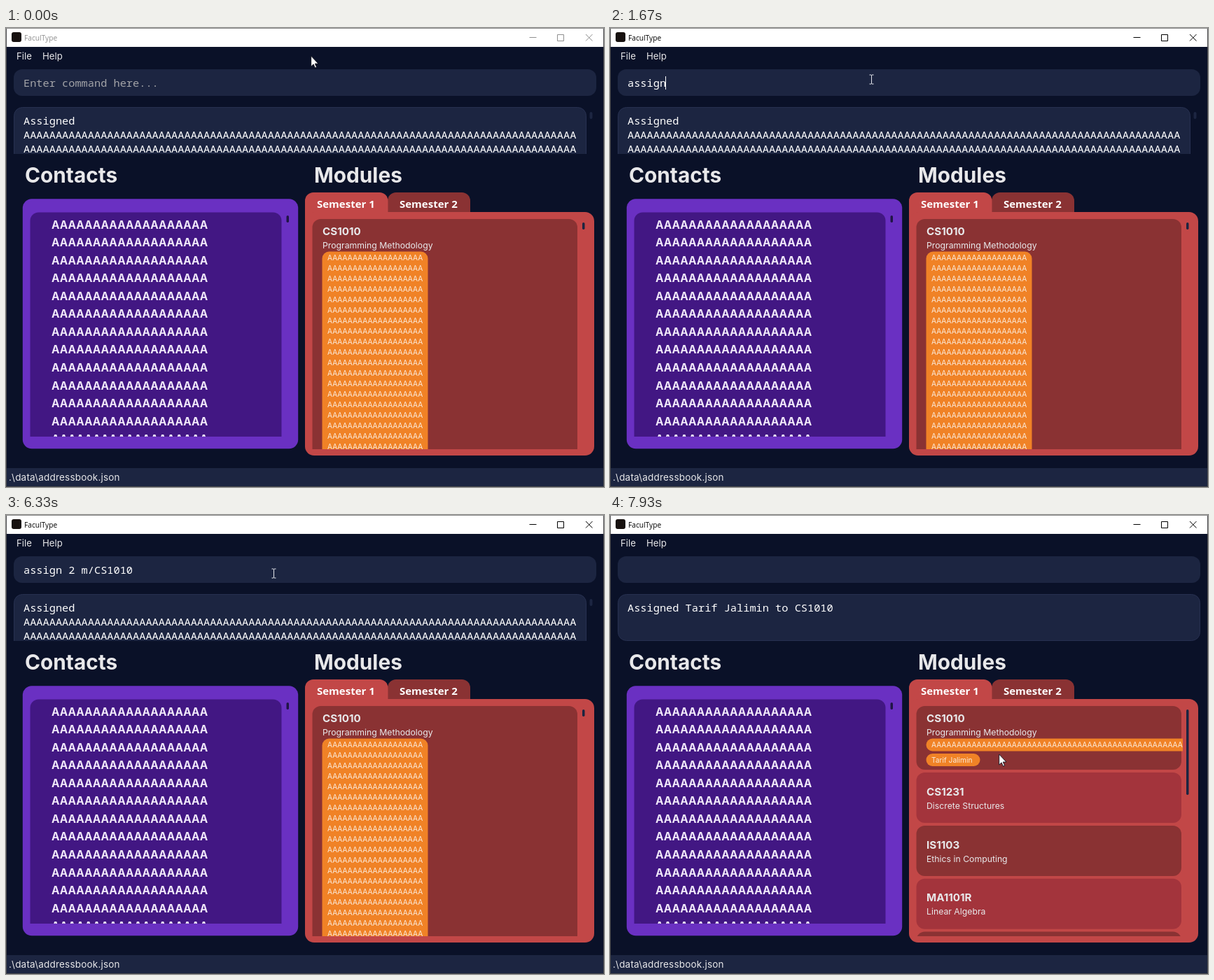
These frames come from a looping animation (854 by 656 pixels, 8 s). An HTML page:

```html
<!DOCTYPE html>
<html lang="en">
<head>
<meta charset="utf-8">
<title>FaculType</title>
<style>
  html, body { margin: 0; width: 100%; height: 100%; overflow: hidden; background: #0a1128; }
  svg { display: block; }
  text { font-family: Inter, sans-serif; fill: #e8e8ea; white-space: pre; }
  .mono { font: 15.3px "Noto Sans Mono", monospace; fill: #fff; }
  .hint { fill: #a3a4a8; }
  .head { font-size: 29.8px; font-weight: 700; }
  .menu { font-size: 13.2px; }
  .path { font-size: 13.5px; letter-spacing: .2px; }
  .contact { font-size: 15.4px; font-weight: 700; letter-spacing: .05px; fill: #f0e8fa; }
  .code { font-size: 15.2px; font-weight: 700; }
  .name { font-size: 12.25px; }
  .tag { font-size: 10.2px; fill: #fbebdc; }
  .tab { font: 700 15px "Open Sans", sans-serif; fill: #fff; }
  .caption { font: 10.2px "Open Sans", sans-serif; fill: currentColor; }
  #bar { color: #000; }
  #bar.idle { color: #8f8f8f; }
</style>
</head>
<body>
<svg id="stage" width="854" height="656" viewBox="0 0 854 656"></svg>
<script>
const LOOP = 8000, TICK = 1000 / 15;
const NAVY = '#1c2541', RED = '#c24747', MAROON = '#8a3233', CRIMSON = '#a3343c', ORANGE = '#f08226';

const box = (x, y, w, h, r, fill, extra = '') =>
  `<rect x="${x}" y="${y}" width="${w}" height="${h}" rx="${r}" fill="${fill}" ${extra}/>`;
// Rectangle rounded only at its top corners
const topBox = (x, y, w, h, r, fill) =>
  `<path d="M${x} ${y + h}V${y + r}a${r} ${r} 0 0 1 ${r} ${-r}h${w - 2 * r}a${r} ${r} 0 0 1 ${r} ${r}V${y + h}z" fill="${fill}"/>`;
const label = (cls, x, y, s) => `<text class="${cls}" x="${x}" y="${y}">${s}</text>`;
const rows = (n, cls, x, y, pitch, s) =>
  Array.from({ length: n }, (_, i) => label(cls, x, y + i * pitch, s)).join('');
const clip = (id, x, y, w, h) => `<clipPath id="${id}">${box(x, y, w, h, 0, '#000')}</clipPath>`;
const course = (y, h, fill, code, name, dy = 32.5) =>
  box(437.5, y, 378.5, h, 12, fill) + label('code', 452, y + dy, code) + label('name', 452, y + dy + 19.2, name);
const resultBox = (w, h) => box(11.5, 113.5, w - 1, h - 1, 12, NAVY, 'stroke="#273050"');

const A = n => 'A'.repeat(n);
const person = 'Tarif Jalimin';

const frame = `
  <defs>
    ${clip('resultClip', 11, 113, 832, 67)}
    ${clip('contactClip', 34, 263, 360, 321)}
    ${clip('moduleClip', 437, 273, 381, 329)}
  </defs>
  ${box(0, 0, 854, 656, 0, '#0a1128')}
  <g id="bar">
    ${box(0, 0, 854, 27, 0, '#fff')}
    ${box(8, 6, 14, 14, 3, '#17110f')}
    ${label('caption', 26, 18, 'FaculType')}
    <path d="M747.5 13.5h10M787.5 9.5h9v9h-9zM828 9l9.5 9.5M837.5 9l-9.5 9.5" fill="none" stroke="currentColor"/>
  </g>
  ${label('menu', 15, 45, 'File')}${label('menu', 52, 45, 'Help')}
  ${box(11, 59, 832, 38, 12, NAVY)}
  <text id="input" class="mono" x="25" y="84"></text>
  <rect id="caret" y="69" width="1" height="19" fill="#fff"/>
  ${label('head', 27, 221, 'Contacts')}${label('head', 440, 221, 'Modules')}
  ${box(23.8, 244.3, 393.4, 357, 13, '#6a30c2')}
  ${topBox(34.5, 263.5, 359, 320.5, 12, '#421783')}
  <g clip-path="url(#contactClip)">${rows(13, 'contact', 65, 286.6, 25.55, A(19))}</g>
  ${box(400.5, 268, 3.5, 10, 1.7, '#201546')}
  ${topBox(545, 235, 118, 29, 12, MAROON)}
  ${topBox(427, 235, 118.5, 45, 12, RED)}
  ${box(427, 263, 413, 348, 13, RED)}
  ${label('tab', 444, 256.5, 'Semester 1')}${label('tab', 562, 256.5, 'Semester 2')}
  ${box(0, 629, 854, 27, 0, NAVY)}
  ${label('path', 4, 646.5, '.\\data\\addressbook.json')}
  <path d="M.5 0V655.5H853.5V0" fill="none" stroke="#4a4a4c"/>
  ${box(0, 0, 854, 1, 0, '#8c8c8c')}`;

const before = `<g id="before">
  <g clip-path="url(#resultClip)">
    ${resultBox(818, 90)}
    ${label('mono', 25, 137.5, 'Assigned')}
    ${rows(2, 'mono', 25, 158, 20.3, A(86))}
  </g>
  ${box(833.5, 120, 4, 10, 2, NAVY)}
  ${topBox(437.5, 273, 378.5, 329, 12, MAROON)}
  ${label('code', 452, 296.3, 'CS1010')}${label('name', 452, 315, 'Programming Methodology')}
  ${topBox(451.5, 319.5, 151, 282.5, 10, ORANGE)}
  <g clip-path="url(#moduleClip)">${rows(19, 'tag', 459, 332.2, 15, A(19))}</g>
  ${box(823, 278, 3.5, 10, 1.7, NAVY)}
</g>`;

const after = `<g id="after">
  ${resultBox(832, 67)}
  ${label('mono', 25, 137.5, `Assigned ${person} to CS1010`)}
  <g clip-path="url(#moduleClip)">
    ${course(273, 91, MAROON, 'CS1010', 'Programming Methodology', 23)}
    ${box(451.5, 319.5, 400, 18, 9, ORANGE)}
    ${label('tag', 459, 332.2, A(55))}
    ${box(451.5, 341, 77, 18, 9, ORANGE)}
    ${label('tag', 459, 353.7, person)}
    ${course(368, 72, CRIMSON, 'CS1231', 'Discrete Structures')}
    ${course(444, 72, MAROON, 'IS1103', 'Ethics in Computing')}
    ${course(519.7, 72, CRIMSON, 'MA1101R', 'Linear Algebra')}
    ${box(437.5, 595.5, 378.5, 72, 12, MAROON)}
  </g>
  ${box(823, 278, 3.5, 122, 1.7, NAVY)}
</g>`;

const pointers = `
  <path id="arrow" d="M-.3 0v15l3.4-3.2 2.3 5.2 2.2-.9-2.3-5.1h4.7z" fill="#fff" stroke="#10121c" stroke-width=".9"/>
  <path id="beam" d="M-3 -6.5h2.5l.5 .5 .5-.5h2.5M0 -6V6M-3 6.5h2.5l.5-.5 .5 .5h2.5" fill="none" stroke="#e4e6ec"/>`;

const $ = id => document.getElementById(id);
$('stage').innerHTML = frame + before + after + pointers;

const command = 'assign 2 m/CS1010';
// [ms, typed characters, caret shown]
const typing = [
  [0, 0, 0], [930, 0, 1], [1000, 1, 1], [1270, 2, 1], [1400, 3, 1], [1470, 4, 1], [1600, 5, 1],
  [1670, 6, 1], [1800, 7, 1], [2000, 8, 1], [2130, 9, 1], [2600, 9, 0], [2870, 10, 1],
  [3070, 11, 1], [4000, 17, 1], [4470, 17, 0], [6870, 0, 0]
];
// [tick, x, y]
const route = [
  [0, 436, 40], [3, 397, 66], [5, 380, 74], [9, 374, 73], [94, 374, 73], [96, 391, 92], [99, 474, 200],
  [101, 522, 254], [102, 528, 260], [103, 528, 261], [113, 528, 261], [115, 513, 284],
  [116, 511, 304], [118, 542, 337], [119, 556, 342]
];

function pointerAt(tick) {
  const i = route.findIndex(p => p[0] > tick);
  if (i < 0) return route.at(-1).slice(1);
  const [t0, x0, y0] = route[i - 1], [t1, x1, y1] = route[i];
  const k = (tick - t0) / (t1 - t0);
  return [Math.round(x0 + (x1 - x0) * k), Math.round(y0 + (y1 - y0) * k)];
}

const show = (id, on) => $(id).setAttribute('visibility', on ? 'visible' : 'hidden');

function draw() {
  const t = performance.now() % LOOP;
  const focused = t >= 330, done = t >= 6870;
  const [, typed, caret] = typing.findLast(s => s[0] <= t);
  const [x, y] = pointerAt(Math.floor((t + 4) / TICK));
  const overField = y >= 59 && y <= 97;

  $('bar').classList.toggle('idle', !focused);
  $('input').classList.toggle('hint', !focused);
  $('input').textContent = focused ? command.slice(0, typed) : 'Enter command here...';
  $('caret').setAttribute('x', Math.round(24.4 + typed * 9.18));
  show('caret', caret);
  show('before', !done);
  show('after', done);
  show('arrow', !overField);
  show('beam', overField);
  $('arrow').setAttribute('transform', `translate(${x} ${y})`);
  $('beam').setAttribute('transform', `translate(${x - .5} ${y + .5})`);
  requestAnimationFrame(draw);
}
draw();
</script>
</body>
</html>
```
